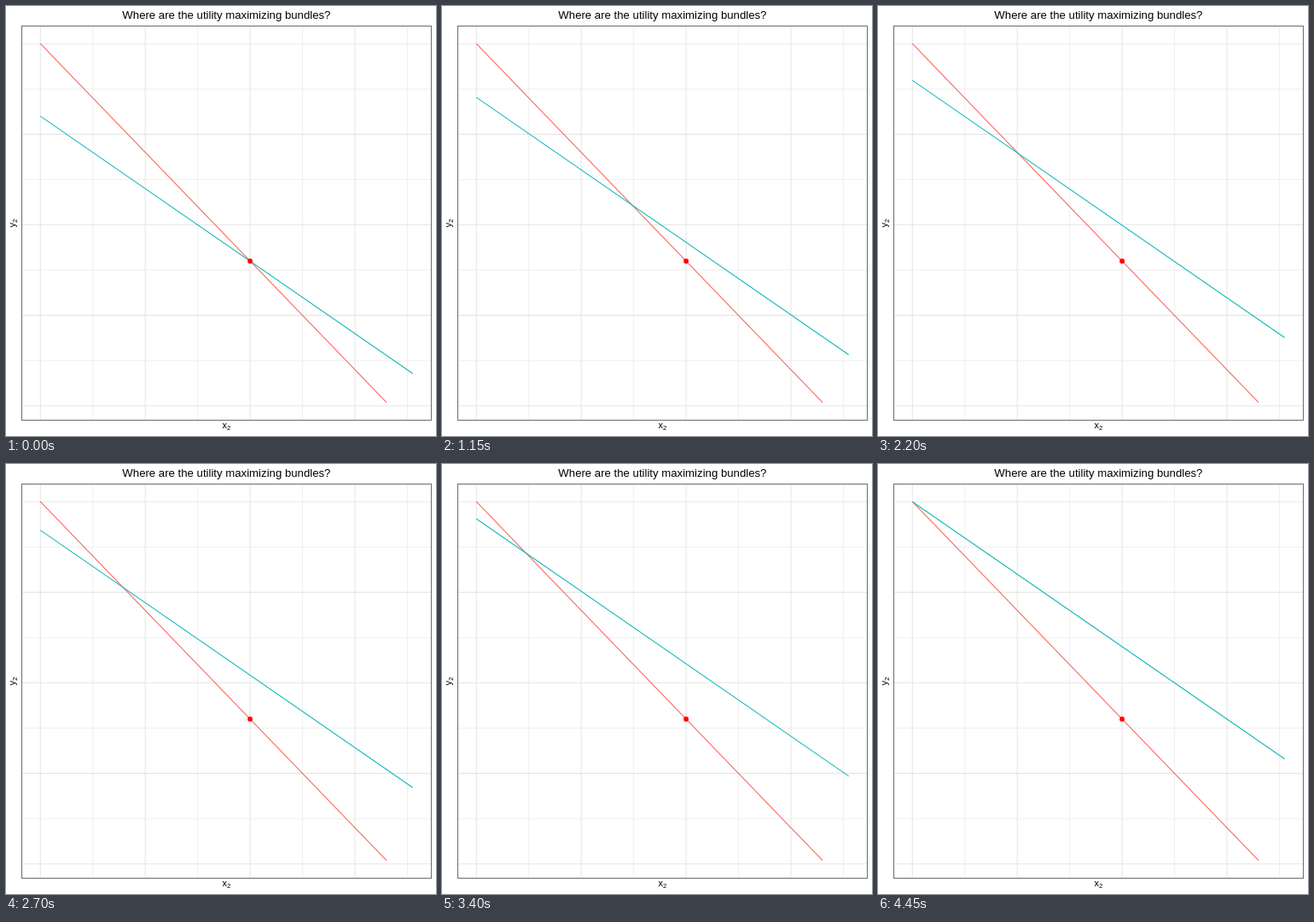
Write an HTML page that moves like this. It is 504 px wide and 504 px high and loops after 5000 ms.

```html
<!DOCTYPE html>
<html lang="en">
<head>
<meta charset="utf-8">
<title>Utility maximizing bundles</title>
<style>
  html, body { margin: 0; width: 100%; height: 100%; overflow: hidden; background: #fff; }
  svg { display: block; width: 504px; height: 504px; }
  text { font: 11px "Liberation Sans", Arial, Helvetica, sans-serif; text-anchor: middle; }
  .title { font-size: 13.2px; }
  .sub { font-size: 7.7px; }
  path, line, rect { fill: none; stroke-width: 1.07; }
</style>
</head>
<body>
<svg viewBox="0 0 504 504">
  <path id="minor" stroke="#ebebeb" style="stroke-width:.8"/>
  <path id="major" stroke="#e6e6e6"/>
  <line x1="40.3" y1="44.2" x2="446" y2="464.7" stroke="#f8665d"/>
  <line id="budget" x1="40.3" x2="476.7" stroke="#14b8b8"/>
  <circle cx="286.1" cy="299" r="2.9" fill="#f00"/>
  <rect x="18.5" y="23.5" width="480" height="462" stroke="#707070"/>
  <text class="title" x="258.4" y="15">Where are the utility maximizing bundles?</text>
  <text x="258.4" y="495">x<tspan class="sub" dy="2">2</tspan></text>
  <text transform="translate(11 254.5) rotate(-90)">y<tspan class="sub" dy="2">2</tspan></text>
</svg>
<script>
  const LOOP = 5000, STEP = 50, LAST = 89;
  const LEFT = 40.3, TOP = 44.2, DX = 122.9, DY = 106.15;
  const byId = id => document.getElementById(id);

  // Grid lines inside the panel, starting at an offset in grid units
  function grid(offset, rows) {
    let d = '';
    for (let i = 0; i < 4; i++) d += `M${LEFT + (i + offset) * DX} 24V485`;
    for (let i = 0; i < rows; i++) d += `M19 ${TOP + (i + offset) * DY}H498`;
    return d;
  }
  byId('minor').setAttribute('d', grid(0.5, 4));
  byId('major').setAttribute('d', grid(0, 5));

  const budget = byId('budget');
  const start = performance.now();

  // The teal line rises at constant speed, then rests until the loop ends
  function draw(now) {
    const t = Math.max(0, now - start) % LOOP;
    const p = Math.min(Math.floor(t / STEP), LAST) / LAST;
    const y = TOP + 0.8 * DY * (1 - p);
    budget.setAttribute('y1', y);
    budget.setAttribute('y2', y + 301.6);
    requestAnimationFrame(draw);
  }
  draw(start);
</script>
</body>
</html>
```
